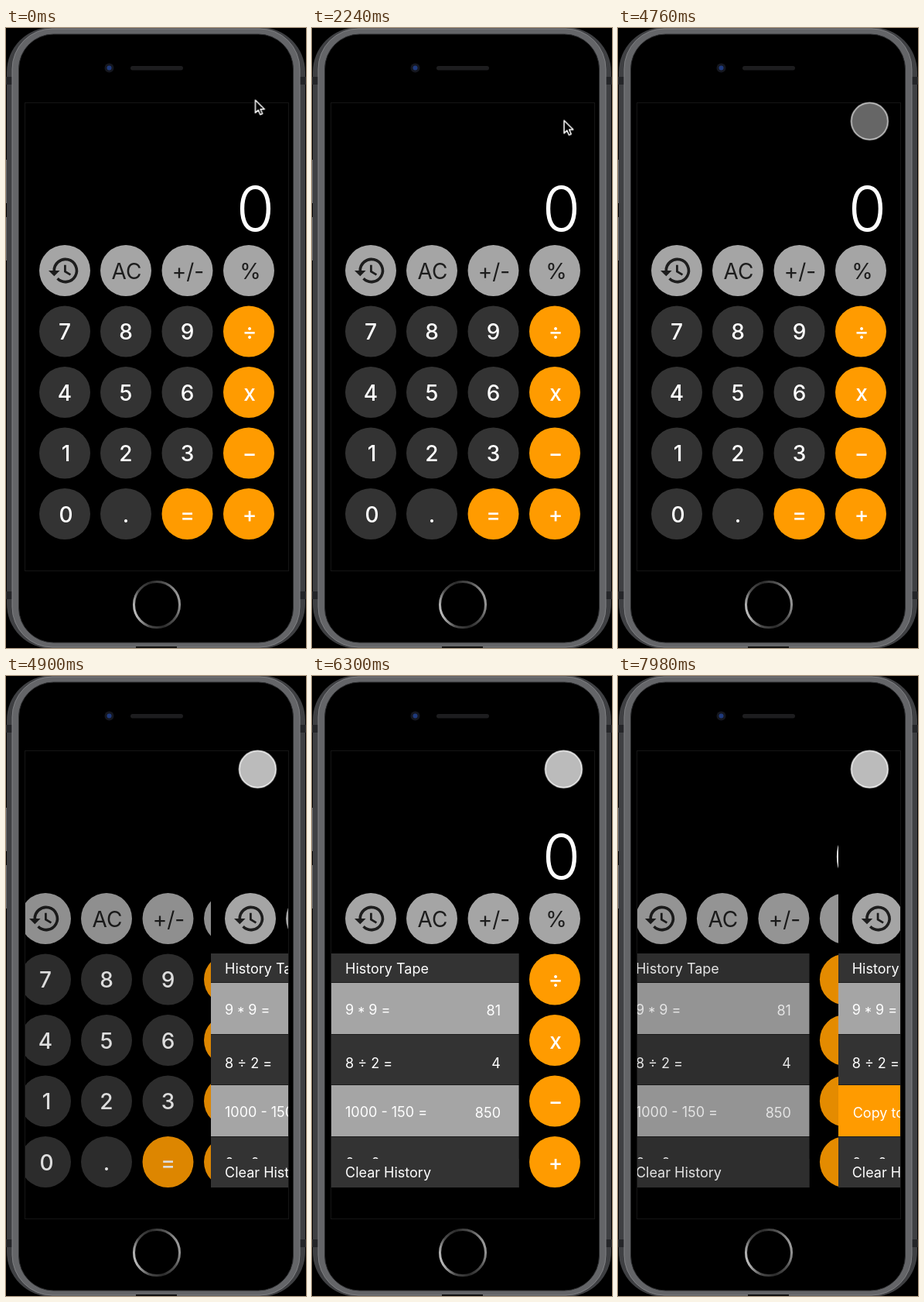
Write an HTML page that moves like this. It is 388 px wide and 800 px high and loops after 8 s.

```html
<!DOCTYPE html>
<html lang="en">
<head>
<meta charset="utf-8">
<title>Calculator</title>
<style>
  html, body { margin: 0; height: 100%; overflow: hidden; background: #000; }
  body > svg { display: block; width: 100vw; height: 100vh; }
  text { font-family: Inter, Roboto, sans-serif; fill: #fff; }
  .key { font-size: 28px; font-weight: 500; text-anchor: middle; }
  .fn { font-weight: 400; fill: #1d1d1d; }
  .total { font-size: 80px; font-weight: 300; text-anchor: middle; }
  .row { font-size: 18px; }
  .star { font-feature-settings: "calt" 0; }
  .end { text-anchor: end; }

  .anim { animation: 8s linear infinite; }
  #keypad { animation-name: keypad; }
  #tape { animation-name: tape; }
  #copy { animation-name: copy; }
  #keypad .dim { animation-name: dim1; }
  #tape .dim { animation-name: dim2; }
  #arrow { animation-name: arrow; }
  #touch { animation-name: touch; }
  #touch circle { animation-name: press; }

  /* Push: 300 ms ease-out; the second push is cut off by the loop end */
  @keyframes keypad {
    0%, 60.55% { transform: translateX(0); animation-timing-function: ease-out; }
    64.3%, 100% { transform: translateX(-85px); }
  }
  @keyframes tape {
    0% { transform: translateX(340px); }
    60.55% { transform: translateX(340px); animation-timing-function: ease-out; }
    64.3% { transform: translateX(0); }
    99.2% { transform: translateX(0); animation-timing-function: cubic-bezier(0, 0, .398, .446); }
    100% { transform: translateX(-27.9px); }
  }
  @keyframes copy {
    0% { transform: translateX(340px); }
    99.2% { transform: translateX(340px); animation-timing-function: cubic-bezier(0, 0, .398, .446); }
    100% { transform: translateX(228.5px); }
  }
  @keyframes dim1 {
    0%, 60.55% { opacity: 0; animation-timing-function: ease-out; }
    64.3%, 100% { opacity: .45; }
  }
  @keyframes dim2 {
    0%, 99.2% { opacity: 0; animation-timing-function: cubic-bezier(0, 0, .398, .446); }
    100% { opacity: .148; }
  }
  @keyframes arrow {
    0% { transform: translate(322.5px, 93px); visibility: visible; animation-timing-function: ease-in-out; }
    17.5% { transform: translate(326.5px, 111.5px); visibility: visible; }
    28.9% { transform: translate(326px, 120px); visibility: visible; }
    28.91%, 100% { transform: translate(326px, 121px); visibility: hidden; }
  }
  @keyframes touch {
    0%, 28.9% { transform: translate(326px, 121.3px); visibility: hidden; }
    28.91%, 50.75% { transform: translate(326px, 121.3px); visibility: visible; }
    56.9%, 100% { transform: translate(325.4px, 120.3px); visibility: visible; }
  }
  @keyframes press {
    0%, 58.62% { fill: #bbb; stroke: #fff; }
    58.625%, 60.54% { fill: #666; stroke: #dcdcdc; }
    60.55%, 97.99% { fill: #bbb; stroke: #fff; }
    98%, 99.19% { fill: #666; stroke: #dcdcdc; }
    99.2%, 100% { fill: #bbb; stroke: #fff; }
  }
</style>
</head>
<body>
<svg viewBox="0 0 388 800">
  <defs>
    <clipPath id="glass"><rect x="24.5" y="97" width="340.5" height="603.5"/></clipPath>
    <linearGradient id="ring" x1="0" y1=".65" x2="1" y2=".35">
      <stop offset="0" stop-color="#c4c4c4"/>
      <stop offset=".22" stop-color="#4a4a4a"/>
      <stop offset=".5" stop-color="#2b2b2b"/>
      <stop offset=".8" stop-color="#555"/>
      <stop offset="1" stop-color="#a0a0a0"/>
    </linearGradient>
  </defs>

  <!-- Phone body -->
  <rect width="388" height="800" fill="#000"/>
  <rect x="1" y="-1" width="386" height="802" rx="58" fill="#3f4043"/>
  <g fill="#242528">
    <path d="M0 63h9v10H0zM379 63h9v10h-9zM0 727h9v10H0zM379 727h9v10h-9z"/>
  </g>
  <path d="M.5 170v56M.5 244v56" stroke="#6c6d70"/>
  <rect x="8" y="1" width="372" height="798" rx="52" fill="#646568" stroke="#808184"/>
  <rect x="16.5" y="8" width="355" height="785" rx="45" fill="#000" stroke="#2c2d2f"/>
  <rect x="168" y="798" width="53" height="2" fill="#111"/>
  <circle cx="133.5" cy="51.5" r="6" fill="#15171f"/>
  <circle cx="133.5" cy="51.5" r="3" fill="#1f3a7d"/>
  <rect x="161" y="49" width="68" height="5.5" rx="2.7" fill="#1d1d1f"/>
  <circle cx="195" cy="744" r="29.5" fill="none" stroke="url(#ring)" stroke-width="3"/>

  <g clip-path="url(#glass)">
    <g id="keypad" class="anim"></g>
    <g id="tape" class="anim"></g>
    <g id="copy" class="anim"></g>
  </g>
  <rect x="24.5" y="96.5" width="341" height="604" fill="none" stroke="#151515"/>

  <path id="arrow" class="anim" d="M0 0V16.4L3.8 12.9 6.3 18.8 9.2 17.5 6.7 11.8H11.8Z"
    fill="#000" stroke="#fff" stroke-width="1.5" stroke-linejoin="round"/>
  <g id="touch" class="anim"><circle class="anim" r="23.7" stroke-width="1.5"/></g>
</svg>

<script>
const GREY = '#a5a5a5', DARK = '#333', ORANGE = '#ff9b00';
const colX = [76, 155, 234.5, 314];
const rowY = [313, 391.5, 470, 548.5, 627];

const rect = (y, h, fill) => `<rect x="25" y="${y}" width="242.5" height="${h}" fill="${fill}"/>`;
const text = (x, y, label, cls = 'row') => `<text x="${x}" y="${y}" class="${cls}">${label}</text>`;

function key(col, row, label, fill, dx = 0) {
  const cls = row ? 'key' : 'key fn';
  return `<circle cx="${colX[col]}" cy="${rowY[row]}" r="33" fill="${fill}"/>` +
    text(colX[col] + dx, rowY[row] + 10.5, label, cls);
}

const clock = `<g transform="translate(53.2 291.2) scale(1.82)" fill="none" stroke="#1d1d1d" stroke-width="2">
  <path d="M5 12.3A8 8 0 1 1 7.35 17.65"/>
  <path d="M12.75 8V12.6L16.6 14.9" stroke-width="1.5"/>
  <path d="M1 12H9L5 16Z" fill="#1d1d1d" stroke="none"/></g>`;

const topRow = key(0, 0, '', GREY) + clock + key(1, 0, 'AC', GREY, 1) +
  key(2, 0, '+/-', GREY, 1) + key(3, 0, '%', GREY, 2);
const operators = ['÷', 'x', '−', '+'].map((s, i) => key(3, i + 1, s, ORANGE, 1)).join('');

const digits = ['789', '456', '123', '0.'].map((line, r) =>
  [...line].map((s, c) => key(c, r + 1, s, DARK, '01'.includes(s) ? 1.5 : 0)).join('')).join('');

const history = thirdRow =>
  rect(358, 302, '#1c1c1c') +
  rect(358, 37, DARK) + text(43, 384, 'History Tape') +
  rect(396, 66, GREY) +
  text(43, 437, '9 <tspan dy="3.5">*</tspan><tspan dy="-3.5"> 9 =</tspan>', 'row star') +
  text(244, 438, '81', 'row end') +
  rect(463, 64, DARK) + text(43, 505.5, '8 ÷ 2 =') + text(244, 506, '4', 'row end') +
  thirdRow +
  rect(595, 65, DARK) + text(43, 634.5, '6 + 6 =') +
  rect(623, 37, DARK) + text(43, 647, 'Clear History');

const sum = rect(528, 66, GREY) + text(43, 568.5, '1000 - 150 =') + text(244, 569.5, '850', 'row end');
const copyRow = rect(528, 66, ORANGE) + text(44, 569.5, 'Copy to Clipboard');

function screen(id, body) {
  const full = 'x="25" y="97" width="340" height="604"';
  document.getElementById(id).innerHTML = `<rect ${full}/>` +
    text(322.5, 261.5, '0', 'total') + topRow + operators + body +
    `<rect class="dim anim" ${full} opacity="0"/>`;
}

screen('keypad', digits + key(2, 4, '=', ORANGE));
screen('tape', history(sum));
screen('copy', history(copyRow));
</script>
</body>
</html>
```
